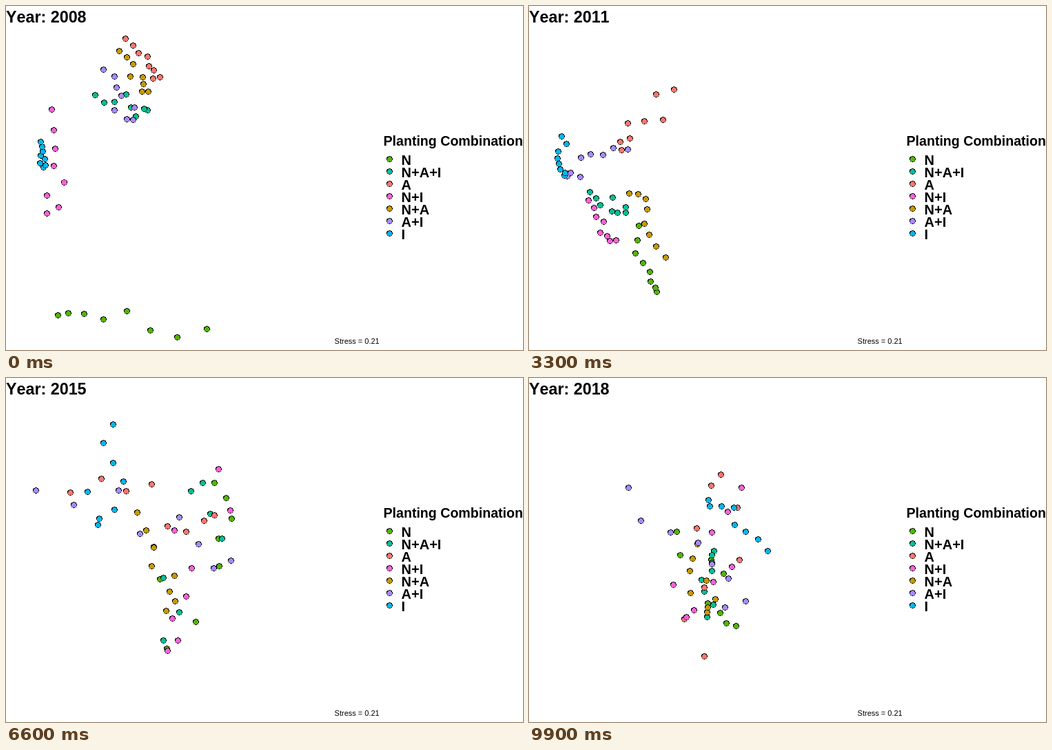
Write an HTML page that moves like this. It is 750x500 px and loops after 10 s.

```html
<!DOCTYPE html>
<html lang="en">
<head>
<meta charset="utf-8">
<title>Planting combinations by year</title>
<style>
  html, body { margin: 0; width: 100%; height: 100%; overflow: hidden; background: #fff; }
  svg { display: block; width: 750px; height: 500px; }
  text { font-family: "Liberation Sans", Arial, sans-serif; font-weight: bold; font-kerning: none; }
  circle { r: 4px; stroke: #000; stroke-width: 1; shape-rendering: crispEdges; }
  #year { font-size: 23.3px; }
  .head { font-size: 19.6px; }
  .key { font-size: 20px; }
  .note { font-size: 11px; font-weight: normal; }
</style>
</head>
<body>
<svg viewBox="0 0 750 500">
  <text id="year" x="0" y="24">Year: 2008</text>
  <text class="head" x="547.5" y="203">Planting Combination</text>
  <text class="note" x="476.6" y="491">Stress = 0.21</text>
  <g id="legend"></g>
  <g id="dots"></g>
</svg>
<script>
const STEP = 100, LAST = 99, FIRST_YEAR = 2008, YEARS = 10, PLOTS = 8;
const CROWDING = 1.4, SPREAD = 0.4;
const stops = [0, 17, 33, 54, 66, 84, LAST];

// At each stop a group is a band of dots from its dense end to its far end.
const groups = [
  { name: 'N', fill: '#53B400', bands: [
    [75, 449, 291, 469], [193, 427, 196, 374], [185, 415, 159, 319], [258, 394, 311, 131],
    [302, 152, 233, 393], [219, 330, 289, 255], [300, 360, 214, 223]] },
  { name: 'N+A+I', fill: '#00C094', bands: [
    [205, 151, 129, 129], [134, 284, 123, 195], [140, 300, 88, 270], [261, 243, 181, 387],
    [285, 152, 228, 381], [241, 289, 189, 160], [268, 251, 258, 347]] },
  { name: 'A', fill: '#F8766D', bands: [
    [223, 103, 173, 47], [284, 137, 181, 69], [134, 209, 210, 121], [260, 134, 139, 342],
    [302, 199, 93, 166], [296, 253, 178, 161], [278, 140, 254, 404]] },
  { name: 'N+I', fill: '#FB61D7', bands: [
    [59, 301, 66, 150], [133, 333, 84, 254], [126, 340, 86, 282], [179, 361, 287, 134],
    [234, 396, 308, 132], [203, 295, 291, 179], [228, 347, 308, 159]] },
  { name: 'N+A', fill: '#C49A00', bands: [
    [206, 124, 164, 65], [139, 119, 195, 309], [145, 272, 198, 365], [148, 356, 252, 283],
    [232, 338, 190, 195], [257, 290, 156, 230], [258, 340, 244, 241]] },
  { name: 'A+I', fill: '#A58AFF', bands: [
    [184, 165, 141, 92], [104, 212, 141, 170], [55, 247, 143, 208], [91, 204, 361, 394],
    [326, 265, 43, 163], [152, 185, 324, 336], [314, 324, 144, 159]] },
  { name: 'I', fill: '#00B6EB', bands: [
    [54, 234, 50, 197], [53, 233, 39, 154], [51, 246, 47, 189], [53, 199, 254, 204],
    [133, 213, 155, 67], [203, 167, 281, 232], [260, 177, 346, 251]] }
];

const $ = id => document.getElementById(id);
const mix = (a, b, u) => a + (b - a) * u;

let seed = 8;
function random() {
  seed = seed * 16807 % 2147483647;
  return seed / 2147483647;
}

function add(parent, tag, attrs, text = '') {
  const el = document.createElementNS('http://www.w3.org/2000/svg', tag);
  for (const name in attrs) el.setAttribute(name, attrs[name]);
  el.textContent = text;
  return parent.appendChild(el);
}

// The end dots sit on the band's ends; the others scatter to its sides.
function scatter([x0, y0, x1, y1], plot) {
  const u = plot / (PLOTS - 1);
  const along = u ** CROWDING;
  const aside = (random() - 0.5) * SPREAD * Math.sqrt(Math.sin(Math.PI * u) + 1e-9);
  return [
    mix(x0, x1, along) - (y1 - y0) * aside,
    mix(y0, y1, along) + (x1 - x0) * aside
  ];
}

const dots = [];
groups.forEach(({ name, fill, bands }, i) => {
  add($('legend'), 'circle', { cx: 556.5, cy: 222.5 + 18 * i, fill });
  add($('legend'), 'text', { class: 'key', x: 573.6, y: 231 + 18 * i }, name);
  for (let plot = 0; plot < PLOTS; plot++) {
    const path = bands.map(band => scatter(band, plot));
    dots.push({ path, el: add($('dots'), 'circle', { fill }) });
  }
});

function draw() {
  const step = Math.floor(performance.now() / STEP) % (LAST + 1);
  const next = Math.max(1, stops.findIndex(stop => stop >= step));
  const u = (step - stops[next - 1]) / (stops[next] - stops[next - 1]);

  $('year').textContent = 'Year: ' + Math.round(FIRST_YEAR + step * YEARS / LAST);
  for (const { path, el } of dots) {
    const [x, y] = path[next].map((end, axis) => mix(path[next - 1][axis], end, u));
    el.setAttribute('cx', Math.round(x) + 0.5);
    el.setAttribute('cy', Math.round(y) + 0.5);
  }
  requestAnimationFrame(draw);
}
draw();
</script>
</body>
</html>
```
